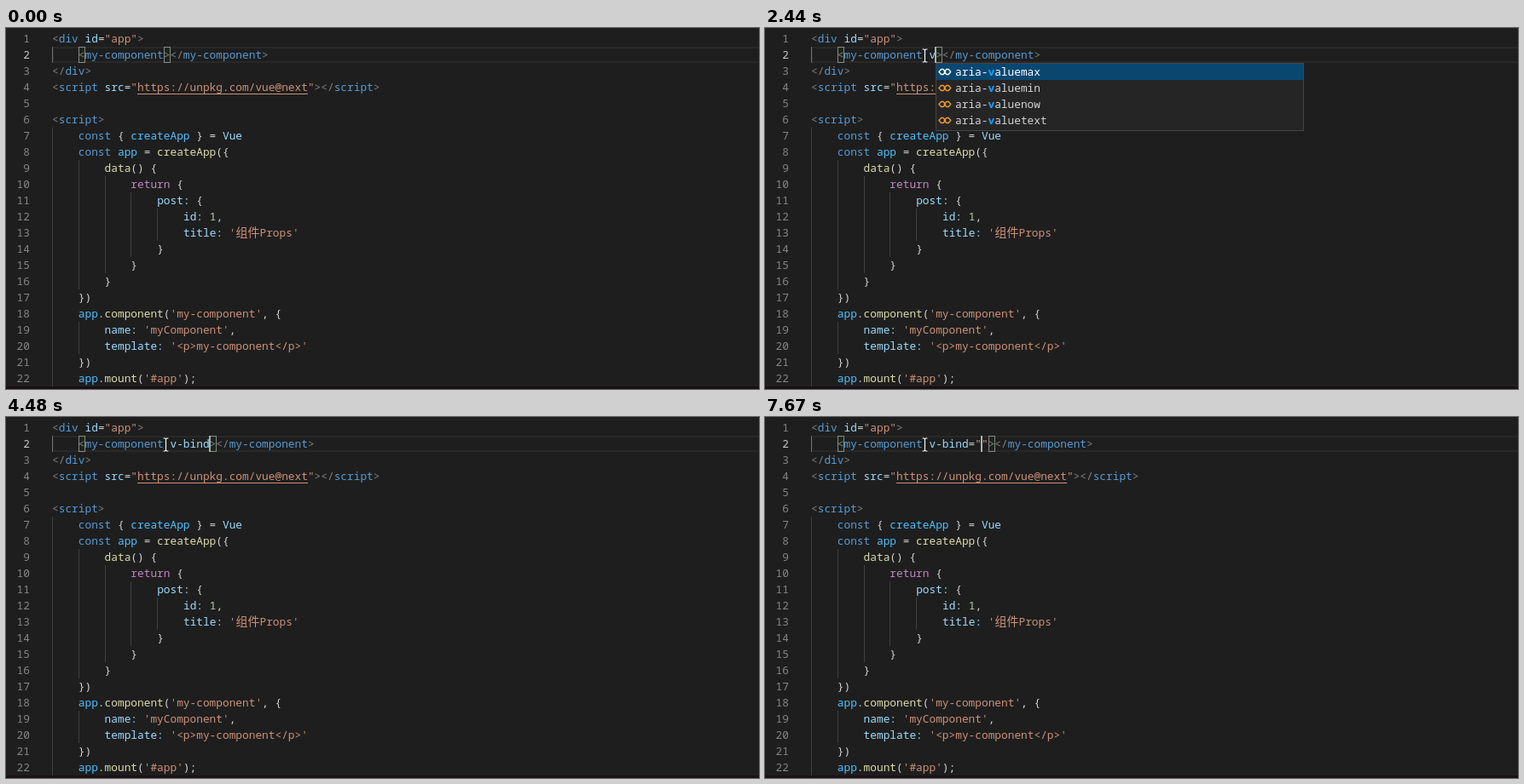
Animation of 883 by 424 pixels, one loop 8 s. Source, as an HTML page:

```html
<!DOCTYPE html>
<html lang="en">
<head>
<meta charset="utf-8">
<title>Typing in a code editor</title>
<style>
html, body { margin: 0; width: 100%; height: 100%; overflow: hidden; background: #1e1e1e; }
svg { display: block; width: 883px; height: 424px; }
text { font: 12.828px "Noto Sans Mono", "DejaVu Sans Mono", monospace; white-space: pre; fill: #d4d4d4; }
.num { fill: #858585; text-anchor: end; }
.num.on { fill: #c6c6c6; }
.p { fill: #808080; }
.t { fill: #569cd6; }
.a { fill: #9cdcfe; }
.s { fill: #ce9178; }
.c { fill: #4fc1ff; }
.f { fill: #dcdcaa; }
.r { fill: #c586c0; }
.n { fill: #b5cea8; }
.z { fill: #ce9178; font: 14px "Noto Sans CJK SC", "Noto Sans CJK", sans-serif; }
.hit { fill: #18a3ff; font-weight: bold; }
.box { fill: #006400; fill-opacity: .1; stroke: #888; }
</style>
</head>
<body>
<svg viewBox="0 0 883 424">
  <rect width="883" height="424" fill="#1e1e1e"/>
  <rect x="55" y="23" width="840" height="17" fill="none" stroke="#282828" stroke-width="2"/>
  <g id="guides" shape-rendering="crispEdges"></g>
  <rect class="box" x="85.5" y="22.5" width="7" height="18"/>
  <rect class="box" id="match" y="22.5" width="7" height="18"/>
  <g id="code"></g>
  <rect x="154" y="77" width="200" height="1" fill="#ce9178"/>
  <rect y="421" width="883" height="3" fill="#190f14"/>
  <rect id="caret" y="22" width="2" height="19" fill="#aeafad"/>
  <g id="popup"></g>
  <circle id="click" cx="185" cy="32.5" r="11.5" fill="#e6da22" opacity=".78"/>
  <g id="mouse" fill="none">
    <path d="M-3.5 .5H-1L0 1.5L1 .5H3.5M0 1.5V14.5M-3.5 15.5H-1L0 14.5L1 15.5H3.5" stroke="#111" stroke-width="2.4" opacity=".6"/>
    <path d="M-3 .5H-1L0 1.5L1 .5H3M0 1.5V14.5M-3 15.5H-1L0 14.5L1 15.5H3" stroke="#fff" stroke-width="1.2"/>
  </g>
</svg>
<script>
const LOOP = 8000, CHAR = 7.697, ROW = 19, LEFT = 54;
const $ = id => document.getElementById(id);
const colX = col => LEFT + col * CHAR;
const baseline = row => 17 + (row - 1) * ROW;

// One line per row: leading spaces, then "~"-separated tokens whose first letter is a class.
const source = [
  "p<~tdiv~p ~aid~w=~s\"app\"~p>",
  "",
  "p</~tdiv~p>",
  "p<~tscript~p ~asrc~w=~s\"https://unpkg.com/vue@next\"~p></~tscript~p>",
  "",
  "p<~tscript~p>",
  "    tconst~w { ~ccreateApp~w } = ~aVue",
  "    tconst~w ~capp~w = ~fcreateApp~w({",
  "        fdata~w() {",
  "            rreturn~w {",
  "                apost:~w {",
  "                    aid:~w ~n1~w,",
  "                    atitle:~w ~s'~z组件~sProps'",
  "                w}",
  "            w}",
  "        w}",
  "    w})",
  "    capp~w.~fcomponent~w(~s'my-component'~w, {",
  "        aname:~w ~s'myComponent'~w,",
  "        atemplate:~w ~s'<p>my-component</p>'",
  "    w})",
  "    capp~w.~fmount~w(~s'#app'~w);"
];

const escape = s => s.replace(/&/g, "&amp;").replace(/</g, "&lt;");
const paint = tokens => tokens.split("~")
  .map(k => `<tspan class="${k[0]}">${escape(k.slice(1))}</tspan>`).join("");

$("code").innerHTML = source.map((line, i) => {
  const row = i + 1, body = line.trimStart(), indent = row === 2 ? 4 : line.length - body.length;
  const y = baseline(row);
  return `<text class="num${row === 2 ? " on" : ""}" x="28" y="${y}">${row}</text>` +
    `<text ${row === 2 ? 'id="edit"' : ""} x="${colX(indent)}" y="${y}">${body && paint(body)}</text>`;
}).join("");

// Indent guides: column, first row, last row
const guide = ([col, from, to]) =>
  `<rect x="${Math.round(colX(col))}" y="${3 + (from - 1) * ROW}" width="1" height="${(to - from + 1) * ROW}" fill="${from === 2 ? "#707070" : "#404040"}"/>`;
$("guides").innerHTML = [[0, 2, 2], [0, 7, 22], [4, 9, 16], [4, 19, 20], [8, 10, 15], [12, 11, 14], [16, 12, 13]]
  .map(guide).join("");

const option = (name, i) => {
  const y = 51.5 + i * ROW;
  const ring = x => `M${x} ${y}l2.6 -3h2.4l2.6 3l-2.6 3h-2.4z`;
  return `<path d="${ring(204)}${ring(210.2)}" fill="none" stroke="${i ? "#ee9d28" : "#fff"}" stroke-width="1.3" stroke-linejoin="round"/>` +
    `<text x="223" y="${y + 4.5}"${i ? "" : ' style="fill:#fff"'}>aria-<tspan class="hit">v</tspan>${name}</text>`;
};
$("popup").innerHTML =
  '<rect x="200.5" y="41.5" width="431" height="79" fill="#252526" stroke="#454545"/>' +
  '<rect x="201" y="42" width="430" height="19" fill="#094771"/>' +
  ["aluemax", "aluemin", "aluenow", "aluetext"].map(option).join("");

// Time, typed text before the caret, caret visible
const steps = [
  [0, "", 0], [1040, "", 1], [1500, " ", 1], [1970, " ", 0], [2320, " v", 1],
  [2680, " v-", 1], [3080, " v-", 0], [3670, " v-", 1], [3780, " v-b", 1],
  [3890, " v-bi", 1], [4130, " v-bin", 1], [4480, " v-bind", 1], [4830, " v-bind", 0],
  [5310, " v-bind", 1], [5550, " v-bind=", 1], [6040, " v-bind=", 0], [6620, " v-bind=", 1],
  [6730, " v-bind=\"", 1], [7200, " v-bind=\"", 0], [7670, " v-bind=\"", 1]
];

const show = (id, on) => $(id).setAttribute("visibility", on ? "visible" : "hidden");

function mouseAt(t) {
  if (t >= 920) return [187.5, 24.5];
  const k = Math.min(7, Math.floor((t - 70) / 104.2)) / 7;
  const e = k * k * (3 - 2 * k);
  return [703.5 - 514 * e, 343 - 313 * e];
}

let shown = null;
function edit(typed) {
  if (typed === shown) return;
  shown = typed;
  const [name, value] = typed.split("=");
  const quotes = value ? '~s""' : "";
  $("edit").innerHTML = paint("p<~tmy-component~a" + name +
    (value === undefined ? "" : "~w=" + quotes) + "~p></~tmy-component~p>");
  const col = 17 + typed.length;
  $("caret").setAttribute("x", Math.floor(LEFT - .5 + col * CHAR));
  $("match").setAttribute("x", Math.round(colX(col + (value ? 1 : 0))) + .5);
}

function draw(t) {
  const [, typed, blink] = steps.filter(s => s[0] <= t).pop();
  edit(typed);
  show("caret", blink);
  show("popup", t >= 2440 && t < 2680);
  show("click", t >= 1040 && t < 1270);
  show("mouse", t >= 70);
  $("mouse").setAttribute("transform", `translate(${mouseAt(t)})`);
}

const start = performance.now();
function tick() {
  draw((performance.now() - start) % LOOP);
  requestAnimationFrame(tick);
}
tick();
</script>
</body>
</html>
```
